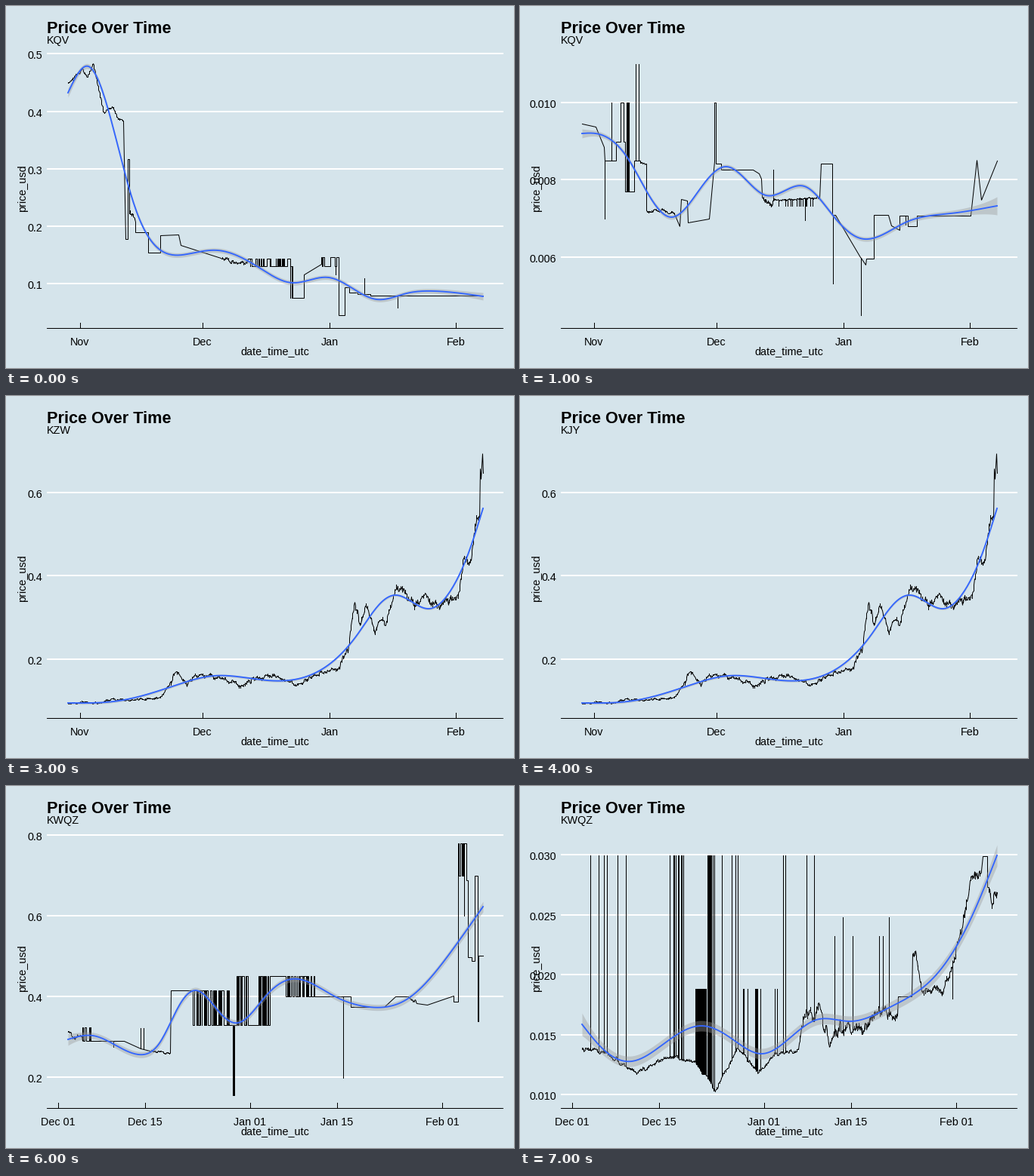
A matplotlib script that plays this animation: 672 px wide and 480 px high, repeating every 8000 ms.

```python
import numpy as np
import matplotlib.pyplot as plt
from matplotlib.animation import FuncAnimation
from matplotlib.patches import Rectangle

W, H, DPI = 672, 480, 96
LEFT, RIGHT, AXIS_Y = 54, 658, 427
START, END = 82, 631
plt.rcParams["font.family"] = "Liberation Sans"
rng = np.random.default_rng(7)

fig = plt.figure(figsize=(W / DPI, H / DPI), dpi=DPI, facecolor="#d5e4eb")
ax = fig.add_axes([0, 0, 1, 1])
ax.set(xlim=(0, W), ylim=(H, 0))
ax.axis("off")


# Path pieces, all in stage pixels

def pts(*v):
    return np.array(v, float).reshape(-1, 2)


def hold(*v):
    """Staircase that keeps each level until the next point."""
    p = pts(*v)
    return np.column_stack([np.repeat(p[:, 0], 2)[1:],
                            np.repeat(p[:, 1], 2)[:-1]])


def rough(amp, *v):
    """Polyline with a slow and a fast random jitter."""
    p = pts(*v)
    x = np.arange(p[0, 0], p[-1, 0] + 0.5, 0.5)
    knots = np.arange(x[0], x[-1] + 4, 3)
    slow = np.interp(x, knots, rng.uniform(-amp, amp, len(knots)))
    fast = rng.uniform(-amp, amp, len(x)) * 0.6
    return np.column_stack([x, np.interp(x, *p.T) + slow + fast])


def flips(x0, x1, a, b, n):
    """Square wave between two levels, switching at random times."""
    xs = np.sort(rng.integers(x0, x1, 2 * n))
    ys = np.where(np.arange(2 * n) % 2, a, b)
    xy = np.column_stack([xs, ys]).ravel()
    return hold(x0, a, *xy, x1, a)


def spike(path, xs, top):
    """Insert instant jumps to one level and back."""
    xs = np.array(xs, float)
    base = np.interp(xs, *path.T)
    jumps = [np.column_stack([xs, y]) for y in (base, top + 0 * xs, base)]
    path = np.vstack([path, *jumps])
    return path[np.argsort(path[:, 0], kind="stable")]


def spline(p):
    """Natural cubic spline through the points."""
    x, y = p.T
    n, h = len(x), np.diff(x)
    a, r = np.eye(n), np.zeros(n)
    for i in range(1, n - 1):
        a[i, i - 1:i + 2] = h[i - 1], 2 * (h[i - 1] + h[i]), h[i]
        r[i] = 6 * ((y[i + 1] - y[i]) / h[i] - (y[i] - y[i - 1]) / h[i - 1])
    m = np.linalg.solve(a, r)
    t = np.linspace(x[0], x[-1], 280)
    k = np.clip(np.searchsorted(x, t) - 1, 0, n - 2)
    u, v, d = x[k + 1] - t, t - x[k], h[k]
    return t, ((m[k] * u**3 + m[k + 1] * v**3) / (6 * d)
               + (y[k] / d - m[k] * d / 6) * u
               + (y[k + 1] / d - m[k + 1] * d / 6) * v)


# Drawing helpers

def box(x, y, w, h, color):
    return ax.add_patch(Rectangle((x, y), w, h, fc=color, lw=0,
                                  antialiased=False, zorder=1))


def label(x, y, s, ha="center", size=10.8, **kw):
    return ax.text(x, y, s, ha=ha, va="baseline", size=size, zorder=6, **kw)


def chart(grid, ticks, path, trend, band):
    """One hidden chart; band is its half width inside and at both ends."""
    parts = []
    for y, s in grid:
        parts += [box(LEFT, y - 1, RIGHT - LEFT, 2, "white"),
                  label(48, y + 7, s, "right")]
    for x, s in ticks:
        parts += [box(x, AXIS_Y - 7, 1, 7, "black"), label(x, 450, s)]
    parts += ax.plot(*(np.round(path) + 0.5).T, color="black", lw=0.75,
                     zorder=3, snap=False, solid_joinstyle="bevel")
    x, y = spline(trend)
    mid, first, last = band
    half = (mid + (first - mid) * np.exp((START - x) / 12)
            + (last - mid) * np.exp((x - END) / 25))
    parts.append(ax.fill_between(x, y - half, y + half, color="#999999",
                                 alpha=0.4, lw=0, zorder=4))
    parts += ax.plot(x, y, color="#3366ff", lw=1.4, zorder=5, snap=False)
    return parts


MONTHS = [(98, "Nov"), (260, "Dec"), (428, "Jan"), (595, "Feb")]
WEEKS = [(69, "Dec 01"), (184, "Dec 15"), (323, "Jan 01"),
         (438, "Jan 15"), (577, "Feb 01")]


def falling():
    path = np.vstack([
        rough(2, 82, 101, 101, 84, 108, 93, 115, 77, 129, 140, 140, 132,
              148, 150, 155, 153),
        hold(158, 309, 161, 203, 163, 275),
        rough(4, 163, 275, 171, 284),
        hold(171, 300, 188, 327, 204, 304),
        pts(228, 303, 231, 317, 284, 334),
        rough(3, 285, 335, 318, 342),
        flips(320, 376, 335, 345, 14),
        flips(376, 380, 387, 345, 2),
        pts(394, 387, 394, 356, 417, 342),
        flips(417, 440, 333, 345, 3),
        hold(440, 410, 448, 373, 454, 380, 465, 382, 482, 384, END, 384)])
    for x, top in (436, 356), (474, 361), (518, 400):
        path = spike(path, [x], top)
    trend = pts(82, 115, 109, 80, 140, 155, 170, 265, 210, 327, 245, 328,
                280, 324, 335, 347, 378, 367, 427, 360, 490, 389, 530, 381,
                565, 378, END, 385)
    grid = [(63, "0.5"), (140, "0.4"), (216, "0.3"), (292, "0.2"),
            (368, "0.1")]
    return chart(grid, MONTHS, path, trend, (3, 6, 5))


def dipping():
    path = np.vstack([
        pts(82, 156, 100, 160, 111, 187),
        hold(112, 205, 127, 180, 133, 128, 137, 180, 139, 246, 151, 205,
             159, 207),
        rough(2, 159, 207, 167, 207),
        rough(2, 167, 272, 190, 270, 206, 277),
        pts(211, 292, 213, 256, 221, 258, 222, 287, 250, 282, 257, 206),
        hold(257, 128, 259, 209, 266, 217, 308, 217),
        pts(316, 222, 319, 229),
        rough(5, 320, 253, 334, 262),
        rough(1.5, 334, 257, 396, 254),
        hold(398, 209, 413, 277, 417, 277),
        pts(450, 333, 457, 343),
        hold(458, 335, 468, 277, 487, 277),
        pts(491, 291, 502, 297),
        hold(502, 278, 513, 292, 525, 278, 596, 277),
        pts(604, 204, 610, 257, END, 205)])
    path = spike(path, range(141, 145), 128)
    path = spike(path, [153, 157], 77)
    path = spike(path, rng.integers(342, 390, 14), 265)
    for x, top in ((112, 282), (121, 128), (335, 217), (377, 284),
                   (414, 368), (451, 410), (510, 290)):
        path = spike(path, [x], top)
    trend = pts(82, 169, 100, 169, 142, 201, 170, 250, 200, 280, 240, 240,
                273, 213, 325, 251, 376, 239, 415, 279, 450, 308, 510, 287,
                570, 275, END, 265)
    grid = [(128, "0.010"), (230, "0.008"), (333, "0.006")]
    return chart(grid, MONTHS, path, trend, (3, 6, 12))


def rallying():
    path = np.vstack([
        rough(1.5, 82, 407, 125, 406, 141, 402, 165, 403, 204, 400, 218, 378),
        rough(3, 218, 378, 224, 364, 239, 384, 250, 368, 290, 375, 310, 384,
              330, 374, 350, 371, 387, 382, 410, 368, 440, 362),
        rough(6, 441, 360, 452, 335, 461, 274, 467, 300, 476, 276, 487, 318,
              495, 293, 503, 297, 518, 252, 540, 278, 555, 262, 573, 283,
              588, 264, 598, 267, 605, 217, 615, 220, 622, 160, 626, 160),
        pts(627, 96, 628, 110, 630, 76, END, 102)])
    trend = pts(82, 407, 150, 404, 220, 385, 275, 371, 345, 377, 415, 364,
                465, 316, 495, 275, 515, 264, 560, 282, 590, 255, 614, 202,
                END, 149)
    grid = [(128, "0.6"), (238, "0.4"), (349, "0.2")]
    return chart(grid, MONTHS, path, trend, (1.5, 1.5, 1.5))


def switching():
    path = np.vstack([
        rough(3, 82, 324, 88, 332, 100, 331),
        flips(101, 113, 338, 320, 4),
        pts(156, 338, 178, 348, 190, 351),
        rough(1.5, 190, 351, 217, 354),
        hold(218, 271, 247, 271),
        flips(247, 288, 271, 317, 18),
        flips(288, 299, 317, 271, 3),
        flips(305, 322, 317, 252, 8),
        flips(334, 349, 317, 252, 7),
        hold(349, 252, 370, 252),
        flips(370, 408, 252, 279, 14),
        hold(408, 279, 456, 293, 500, 293),
        pts(515, 279, 532, 279),
        rough(2, 532, 281, 543, 287),
        pts(557, 290, 592, 278),
        hold(592, 286, 598, 76, 599, 76),
        flips(599, 609, 76, 119, 4),
        hold(609, 125, 611, 227, 616, 232, 620, 119, 624, 312, 625, 225,
             END, 225)])
    path = spike(path, [178, 182], 321)
    path = spike(path, [300, 301, 302], 410)
    for x, top in (142, 346), (446, 387), (606, 172):
        path = spike(path, [x], top)
    trend = pts(82, 336, 115, 331, 175, 356, 203, 341, 228, 293, 250, 271,
                285, 303, 307, 314, 345, 277, 378, 256, 435, 279, 480, 293,
                530, 283, 590, 218, END, 160)
    grid = [(65, "0.8"), (172, "0.6"), (279, "0.4"), (386, "0.2")]
    return chart(grid, WEEKS, path, trend, (4, 8, 7))


def spiking():
    path = np.vstack([
        rough(3, 82, 349, 110, 352, 155, 380, 195, 358, 230, 364, 258, 403,
              288, 347, 315, 380, 338, 353, 368, 350),
        rough(9, 369, 340, 376, 307, 396, 298, 410, 345, 422, 322, 450, 322,
              475, 296, 499, 303),
        hold(500, 279, 518, 279),
        rough(6, 519, 230, 523, 220, 531, 268, 558, 272, 573, 235),
        rough(10, 574, 228, 585, 190, 595, 128, 610, 122),
        hold(612, 93, 618, 125),
        rough(8, 618, 130, 624, 156, END, 135)])
    lone = [93, 104, 111, 115, 129, 140, 280, 285, 288, 348, 351, 379, 389]
    bursts = [rng.integers(198, 220, 12), rng.integers(247, 258, 16),
              rng.integers(264, 268, 3)]
    path = spike(path, np.concatenate([lone, *bursts]), 92)
    path = spike(path, range(232, 247), 269)
    path = spike(path, rng.integers(291, 347, 12), 269)
    path = spike(path, [416, 440, 475, 480], 199)
    path = spike(path, [427, 488], 174)
    path = spike(path, [572], 282)
    trend = pts(82, 316, 110, 349, 148, 365, 190, 342, 240, 318, 280, 335,
                320, 355, 350, 340, 392, 310, 437, 312, 490, 293, 550, 251,
                600, 168, END, 92)
    grid = [(91, "0.030"), (171, "0.025"), (250, "0.020"), (330, "0.015"),
            (409, "0.010")]
    return chart(grid, WEEKS, path, trend, (7, 15, 14))


charts = [falling(), dipping(), rallying(), switching(), spiking()]

# Fixed frame of the plot
box(LEFT, AXIS_Y, RIGHT - LEFT, 1, "black")
label(LEFT, 36, "Price Over Time", "left", 16.2, weight="bold")
label(355.5, 462, "date_time_utc")
label(26, 242, "price_usd", rotation=90, rotation_mode="anchor")
ticker = label(LEFT, 50, "", "left")

TICKERS = ["KQV", "KZW", "KJY", "KWQZ"]


def update(i):
    # The ticker lags one step behind its chart.
    for k, parts in enumerate(charts):
        for part in parts:
            part.set_visible(k == (i + 1) // 2)
    ticker.set_text(TICKERS[i // 2])
    return [ticker]


update(0)
anim = FuncAnimation(fig, update, frames=8, interval=1000, repeat=True)
plt.show()
```
